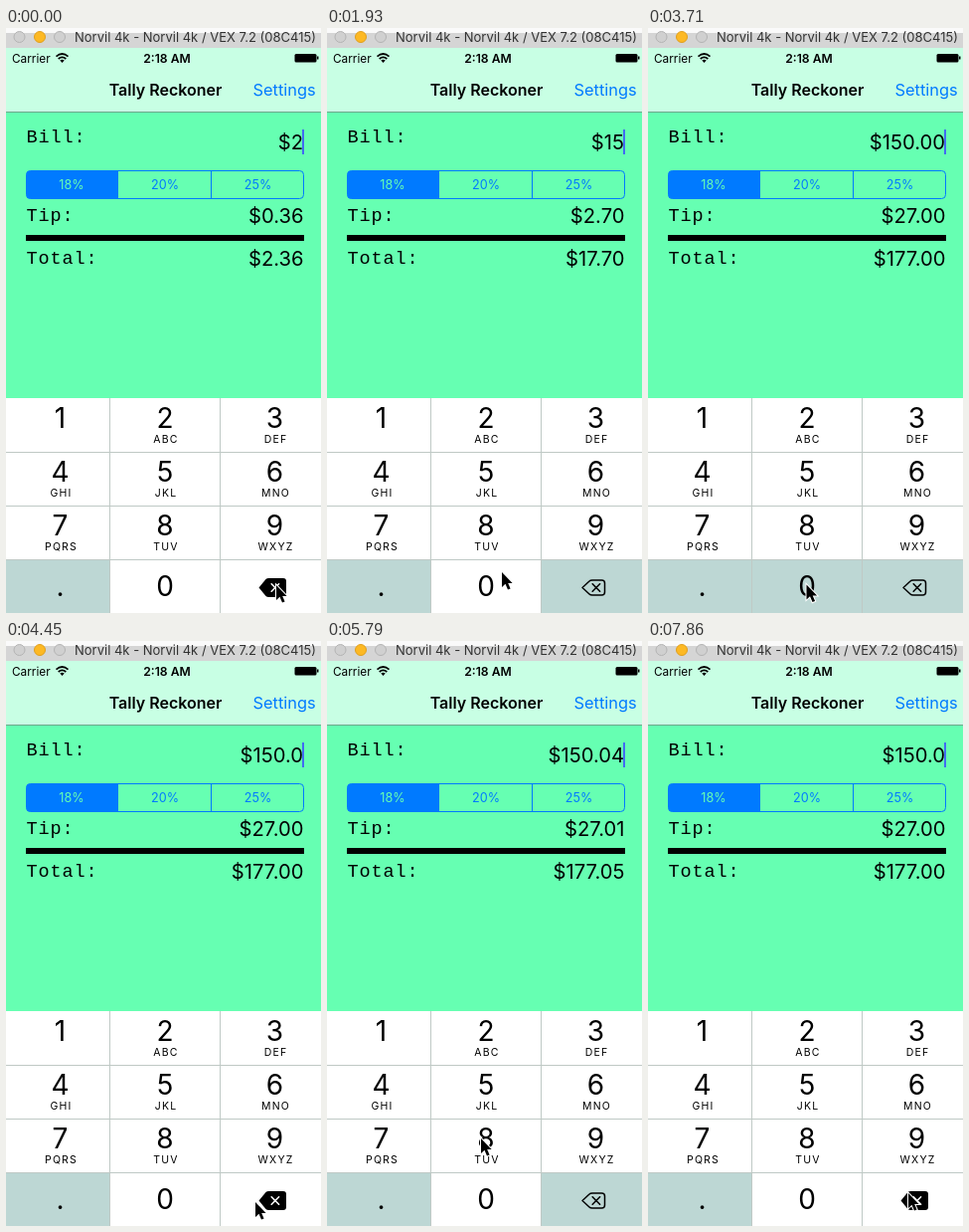
Write an HTML page that moves like this. It is 317x588 px and loops after 8000 ms.

```html
<!DOCTYPE html>
<html lang="en">
<head>
<meta charset="utf-8">
<title>Tally Reckoner</title>
<style>
html, body { margin: 0; width: 100%; height: 100%; overflow: hidden; }
svg { display: block; font-family: Inter, Roboto, sans-serif; }
.mono { font: 18.5px "Liberation Mono", "Courier New", monospace; letter-spacing: .9px; }
.sum { font-size: 20.2px; text-anchor: end; }
.mid { text-anchor: middle; }
.seg { font-size: 12.6px; fill: #007aff; text-anchor: middle; }
.digit { font-size: 28px; text-anchor: middle; }
.sub { font-size: 10.5px; letter-spacing: 1.2px; text-anchor: middle; }
</style>
</head>
<body>
<svg width="317" height="588" viewBox="0 0 317 588">
  <rect width="317" height="588" fill="#66ffb2"/>
  <rect width="317" height="20" fill="#d5d5d5"/>
  <rect width="317" height="5" fill="#fafafa"/>
  <g fill="#d0d0d0" stroke="#b4b4b4">
    <circle cx="13.5" cy="9" r="5.5"/>
    <circle cx="34" cy="9" r="5.5" fill="#fdb924" stroke="#e0a01f"/>
    <circle cx="54" cy="9" r="5.5"/>
  </g>
  <text class="mid" x="190.5" y="14" font-size="13" fill="#333">Norvil 4k - Norvil 4k / VEX 7.2 (08C415)</text>

  <rect y="20" width="317" height="64" fill="#c8ffe4"/>
  <rect y="84" width="317" height="1" fill="#6fa68c"/>
  <text x="6" y="34.5" font-size="11.8">Carrier</text>
  <g fill="none" stroke="#000" stroke-width="1.7">
    <path d="M50.5 28.6Q56.5 23.4 62.5 28.6M52.7 31Q56.5 27.8 60.3 31"/>
    <path d="M56.5 35L54.3 32.6Q56.5 31 58.7 32.6Z" fill="#000" stroke="none"/>
  </g>
  <text class="mid" x="162" y="34.5" font-size="12.2" font-weight="600">2:18 AM</text>
  <rect x="290.5" y="26" width="22" height="8.5" rx="1.5"/>
  <rect x="313" y="28.5" width="1.5" height="3"/>
  <text class="mid" x="160.5" y="68" font-size="16" font-weight="600">Tally Reckoner</text>
  <text x="248.5" y="68" font-size="16.4" fill="#007aff">Settings</text>

  <g class="mono">
    <text x="20.5" y="115">Bill:</text>
    <text x="20.5" y="194">Tip:</text>
    <text x="20.5" y="237">Total:</text>
  </g>
  <text class="sum" id="bill" x="299" y="122"/>
  <text class="sum" id="tip" x="299.5" y="196"/>
  <text class="sum" id="total" x="299.5" y="239"/>
  <rect id="caret" x="298" y="102" width="2" height="25" fill="#426bf2"/>
  <path d="M113 143.5H24Q20.5 143.5 20.5 147V168Q20.5 171.5 24 171.5H113Z" fill="#007aff"/>
  <rect x="20.5" y="143.5" width="279" height="28" rx="4" fill="none" stroke="#007aff"/>
  <path d="M206.5 143V172" stroke="#007aff"/>
  <text class="seg" x="66" y="162" style="fill:#66ffb2">18%</text>
  <text class="seg" x="160" y="162">20%</text>
  <text class="seg" x="253.5" y="162">25%</text>
  <rect x="20" y="208" width="280" height="6"/>

  <g id="pad"></g>
  <path d="M0 426.5H317M0 480.5H317M0 534.5H317M104.5 372V588M215.5 372V588" stroke="#bfc9c5"/>
  <g id="labels"></g>
  <g stroke-linejoin="round" stroke-linecap="round">
    <path id="tag" stroke-width="1.5"/>
    <path id="cross" d="M267.2 558.8l7.4 7.4m0-7.4l-7.4 7.4" stroke-width="1.6"/>
  </g>
  <path id="mouse" d="M0 0V15L3.5 11.8L6 17.6L8.6 16.5L6.2 11H10.6Z" stroke="#fff" stroke-width="2" paint-order="stroke"/>
</svg>
<script>
const $ = id => document.getElementById(id);
const LOOP = 8000, STEP = 148.2;
const KEYS = [...'123456789.0<'];
const LETTERS = ['', 'ABC', 'DEF', 'GHI', 'JKL', 'MNO', 'PQRS', 'TUV', 'WXYZ'];
const COLS = [0, 105, 216, 317], CENTERS = [54.5, 160, 270.5];
const GREY = '#bdd7d4', WHITE = '#fff';

// [step, key pressed, bill text from then on]
const TAPS = [
  [0, '<', '2'], [9, '1', '1'], [11, '5', '15'], [16, '0', '150'],
  [18, '.', '150.'], [23, '0', '150.0'], [25, '0', '150.00'], [30, '<', '150.0'],
  [36, '4', '150.04'], [40, '8', '150.04'], [49, '<', '150.0'], [53, '<', '150.0']
];
const CARET_OFF = [[5, 7], [33, 35], [44, 46]];
// pointer tip: [step, x, y]
const PATH = [
  [0, 272, 560], [2, 270, 558], [7, 82, 395], [8, 78, 390], [9, 76, 390],
  [11, 158, 446], [12, 165, 480], [13, 176, 547], [15, 166, 556], [16, 164, 556],
  [18, 72, 556], [19, 76, 556], [20, 116, 556], [22, 158, 558], [26, 160, 560],
  [29, 248, 564], [31, 254, 564], [35, 72, 448], [37, 70, 446], [39, 155, 500],
  [41, 156, 502], [47, 258, 554], [48, 262, 555], [54, 262, 555]
];

KEYS.forEach((key, i) => {
  const c = i % 3, y = 372 + 54 * (i / 3 | 0);
  const base = i < 9 ? y + 30 : y + 37;
  $('pad').innerHTML += `<rect x="${COLS[c]}" y="${y}" width="${COLS[c + 1] - COLS[c]}" height="54"/>`;
  if (key === '<') return;
  $('labels').innerHTML += `<text class="digit" x="${CENTERS[c]}" y="${base}">${key}</text>` +
    `<text class="sub" x="${CENTERS[c] + 1}" y="${y + 45}">${LETTERS[i] || ''}</text>`;
});
const cells = [...$('pad').children];

function tagPath(left, right, top, bottom) {
  const mid = (top + bottom) / 2, neck = left + 7;
  return `M${left} ${mid}L${neck} ${top + 1}Q${neck + 1} ${top} ${neck + 3} ${top}H${right - 3}` +
    `Q${right} ${top} ${right} ${top + 3}V${bottom - 3}Q${right} ${bottom} ${right - 3} ${bottom}` +
    `H${neck + 3}Q${neck + 1} ${bottom} ${neck} ${bottom - 1}Z`;
}

function pointer(step) {
  const n = PATH.findIndex(p => p[0] > step);
  const [s0, x0, y0] = PATH[n - 1], [s1, x1, y1] = PATH[n];
  const k = (step - s0) / (s1 - s0);
  return [x0 + (x1 - x0) * k, y0 + (y1 - y0) * k];
}

function draw(time) {
  const step = Math.min(53, Math.floor(time % LOOP / STEP + 0.05));
  const tap = TAPS.filter(t => t[0] <= step).pop();
  const pressed = tap[0] === step ? tap[1] : '';
  const text = step > 0 && step < 9 ? '' : tap[2];
  const amount = Number(text), tip = amount * 0.18;
  $('bill').textContent = '$' + text;
  $('tip').textContent = '$' + tip.toFixed(2);
  $('total').textContent = '$' + (amount + tip).toFixed(2);
  $('caret').style.opacity = CARET_OFF.some(([a, b]) => step >= a && step <= b) ? 0 : 1;

  KEYS.forEach((key, i) => {
    const special = key === '.' || key === '<';
    cells[i].setAttribute('fill', special !== (key === pressed) ? GREY : WHITE);
  });
  const down = pressed === '<';
  $('tag').setAttribute('d', down ? tagPath(254.5, 282, 553, 572) : tagPath(257, 279.5, 555, 570));
  $('tag').setAttribute('fill', down ? '#000' : 'none');
  $('tag').setAttribute('stroke', down ? 'none' : '#000');
  $('cross').setAttribute('stroke', down ? WHITE : '#000');
  $('mouse').setAttribute('transform', `translate(${pointer(step)})`);
}

const start = performance.now();
(function frame() {
  draw(performance.now() - start);
  requestAnimationFrame(frame);
})();
</script>
</body>
</html>
```
